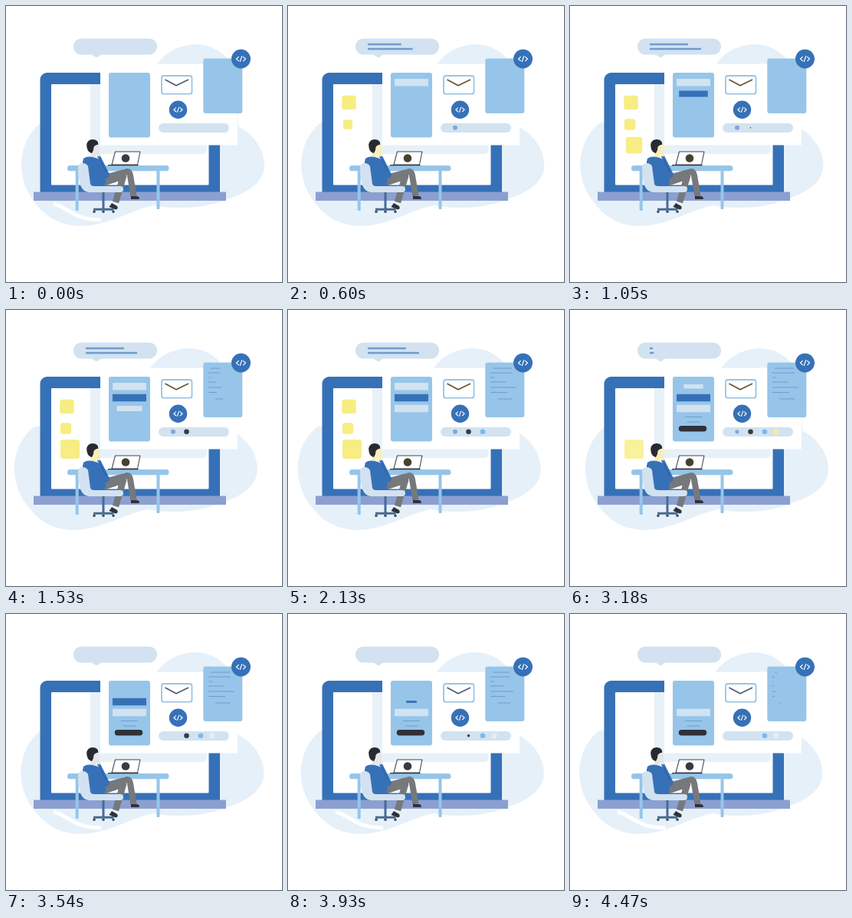
Recreate the animation shown at these times as an HTML page with a canvas. Size 360x360 px, loop 4500 ms.

```html
<!DOCTYPE html>
<html lang="en">
<head>
<meta charset="utf-8">
<title>Web design at a desk</title>
<style>
html, body { margin: 0; width: 100%; height: 100%; overflow: hidden; background: #fff; }
canvas { display: block; width: 360px; height: 360px; }
</style>
</head>
<body>
<canvas id="stage"></canvas>
<script>
const LOOP = 4500, STEP = 30;
const BLUE = '#3671b8', SKY = '#96c5e9', PALE = '#d2e2f0', MIST = '#e6f0f9',
      LINE = '#6f9bcf', DARK = '#303139', YELLOW = '#f7ed83', GREY = '#77787b';
const canvas = document.getElementById('stage');
const ctx = canvas.getContext('2d');
const dpr = window.devicePixelRatio || 1;
canvas.width = canvas.height = 360 * dpr;
ctx.scale(dpr, dpr);
ctx.lineJoin = 'round';

// Eased 0..1 progress between two times
function ramp(t, from, to) {
  const x = Math.min(1, Math.max(0, (t - from) / (to - from)));
  return (1 - Math.cos(Math.PI * x)) / 2;
}

// Visible amount of a part that enters and later leaves
const presence = (t, a, b, c, d) => ramp(t, a, b) * (1 - ramp(t, c, d));

function box(x, y, w, h, r, color) {
  if (w <= 0 || h <= 0) return;
  ctx.fillStyle = color;
  ctx.beginPath();
  ctx.roundRect(x, y, w, h, r);
  ctx.fill();
}

function scaledBox(cx, cy, w, h, r, color, s) {
  box(cx - w * s / 2, cy - h * s / 2, w * s, h * s, r * s, color);
}

function disc(x, y, r, color) {
  if (r <= 0) return;
  ctx.fillStyle = color;
  ctx.beginPath();
  ctx.arc(x, y, r, 0, Math.PI * 2);
  ctx.fill();
}

function shape(d, color) {
  ctx.fillStyle = color;
  ctx.fill(new Path2D(d));
}

function stroke(d, color, width, cap = 'butt') {
  ctx.strokeStyle = color;
  ctx.lineWidth = width;
  ctx.lineCap = cap;
  ctx.stroke(new Path2D(d));
}

function growLine(x, y, length, amount, color, width) {
  if (amount > 0.01) stroke(`M${x} ${y}h${length * amount}`, color, width);
}

function drawBlob(t, warm) {
  ctx.save();
  ctx.translate(-4.6 * (1 - Math.cos(2 * Math.PI * t / 3270)), 0);
  shape(`M46 152 C30 164 20 185 20 207 C20 228 29 247 40 259
    C55 278 75 287 98 287 C136 286 162 266 194 260 C222 266 262 264 288 252
    C316 244 337 229 337 208 C337 186 323 168 303 157
    C302 125 304 92 290 70 C276 54 261 50 246 50 C223 51 205 63 196 78
    L120 150 Z`, MIST);
  ctx.restore();
  if (!warm) stroke('M62 258 C80 262 88 279 124 279', '#fff', 5);
}

function drawScreen() {
  box(44.5, 87, 234.5, 157, [9, 9, 0, 0], BLUE);
  box(59, 102, 205.5, 131.5, 1, '#fff');
  box(36, 242.5, 251, 11.5, 0, '#8ba0d1');
  box(110, 102, 151.5, 91, [0, 0, 5, 0], '#e8f0f8');
  box(123, 75.5, 179, 106, 1, '#fff');
}

function drawBubble(t) {
  box(88, 42.5, 109, 21, 10, PALE);
  shape('M111 63 L118 67.5 L125 63 Z', PALE);
  const k = presence(t, 100, 750, 2650, 3300);
  growLine(104, 50, 50, k, LINE, 2.4);
  growLine(104, 56, 67, k, LINE, 2.4);
}

function drawNotes(t) {
  const notes = [
    [79.5, 126, 18.5, 180, 2350, 2750],
    [78, 154.5, 14.5, 300, 2650, 3050],
    [83.5, 181.5, 25, 750, 3020, 3560]
  ];
  for (const [x, y, size, enter, leave, gone] of notes) {
    ctx.globalAlpha = 1 - ramp(t, leave, gone);
    scaledBox(x, y, size, size, 3.5, YELLOW, ramp(t, enter, enter + 400));
  }
  ctx.globalAlpha = 1;
}

function drawForm(t) {
  box(134, 87, 54, 84.5, 3, SKY);
  scaledBox(161, 99.7, 44, 9.5, 0, PALE, presence(t, 200, 560, 3000, 3400));
  scaledBox(161, 114.5, 44, 9.5, 0, BLUE, presence(t, 780, 1140, 3680, 4080));
  scaledBox(161, 128.5, 44, 9.5, 0, PALE, presence(t, 1290, 1650, 4460, 4860));
  const a = ramp(t, 2150, 2500), b = ramp(t, 2300, 2650);
  growLine(161 - 11 * a, 139.5, 22, a, LINE, 1);
  growLine(161 - 8.5 * b, 146, 17, b, LINE, 1);
  scaledBox(160, 154.7, 36.5, 7.5, 3.7, DARK, ramp(t, 2550, 2900));
}

function drawDocument(t) {
  box(257.3, 68.5, 51, 71.5, 3, SKY);
  const lines = [[267, 25], [263, 30], [264.5, 5], [264, 20], [264, 34], [264, 22], [273, 20]];
  const ys = [76, 82, 88, 94, 101, 107.5, 116];
  const k = presence(t, 1100, 1960, 3720, 4700);
  lines.forEach(([x, w], i) => growLine(x, ys[i], w, k, '#7499cb', 1));
}

function drawEnvelope(warm) {
  ctx.beginPath();
  ctx.roundRect(203, 91, 39.5, 23.7, 3);
  ctx.fillStyle = '#fff';
  ctx.fill();
  ctx.strokeStyle = SKY;
  ctx.lineWidth = 1.8;
  ctx.stroke();
  stroke('M207.5 96 L222 103.8 L238 96', warm ? '#66552f' : '#505a78', 1.7);
}

function drawCodeBadge(x, y, r) {
  disc(x, y, r, BLUE);
  ctx.save();
  ctx.translate(x, y);
  ctx.scale(r / 12, r / 12);
  stroke('M-3 -2.5 L-5.7 0 L-3 2.5 M3 -2.5 L5.7 0 L3 2.5 M1.2 -3.3 L-1.2 3.3',
    '#f4f8fc', 1.2, 'round');
  ctx.restore();
}

function drawSlider(t, warm) {
  box(199, 153, 92, 12, 6, PALE);
  disc(218, 158.8, 3 * presence(t, 230, 550, 3080, 3500), '#7fa8d8');
  disc(235.5, 158.8, 3.3 * presence(t, 950, 1270, 3700, 4180), '#393b43');
  disc(254, 158.8, 3.3 * presence(t, 1700, 2050, 4460, 4860), '#7db8e8');
  disc(269, 158.8, 3.7 * ramp(t, 2400, 2750), warm ? '#f2eda0' : '#e8ecef');
}

function drawDesk(warm) {
  box(90.7, 213, 4, 54, 1, SKY);
  box(196.5, 213, 4, 52, 1, SKY);
  box(80, 208, 132.5, 7.3, 3.6, SKY);
  const lid = 'M142.5 190 H175 L171.5 207 H138 Z';
  shape(lid, '#fff');
  stroke(lid, '#454b58', 1.1);
  stroke('M133 207.6 H172.5', DARK, 1.3);
  disc(156, 198.5, 5.3, warm ? '#46422f' : '#383a43');
}

function drawPerson(warm) {
  const skin = warm ? '#f7efb9' : '#e5e6e9';
  // Chair stand
  stroke('M127 242 V265 M114 265.3 H140.5', '#496b91', 3);
  for (const x of [115, 127, 140]) disc(x, 268.2, 1.8, '#3d5267');
  // Legs and shoes
  stroke('M123 232 L153 222 L143 256', GREY, 8.5);
  stroke('M124 225 L158 216 Q161 216 162 221 L166.5 248', GREY, 8);
  shape('M163 248 L171 248 Q175 249 173.5 252 L163 252 Z', DARK);
  shape('M138 257 L145 261 Q147 265 143 265.5 L134.5 262 Z', DARK);
  // Body and the arm that props the chin
  shape(`M101 199 C106 195 115 196 121 200 L128 211 L135 219
    Q136 224 130 225 L129 235 H108 C105 222 97 210 101 199 Z`, BLUE);
  stroke('M121 196 L133 220', BLUE, 4, 'round');
  stroke('M122 200 L130 216', '#295989', 0.8);
  // Head
  shape('M112 185 L121 179 L122.5 188 Q122 193 118 194 L117 198 L110 196 Z', skin);
  disc(121, 194, 2.4, skin);
  shape(`M105.5 184 C104 177 109 174 113 174 C118 174 121 177 120 181
    C116 181 114 183 114 188 L112 192 C108 191 106 188 105.5 184 Z`, '#292a31');
  // Chair back and seat
  shape(`M94 210 C94 204 104 203 107 209 L110 232 Q111 235 115 235
    H149 Q153 235 153 239 Q153 243 149 243 H108 C98 241 95 234 94 210 Z`, PALE);
}

function draw(t) {
  const warm = t > 210 && t < 3500;
  ctx.fillStyle = '#fff';
  ctx.fillRect(0, 0, 360, 360);
  drawBlob(t, warm);
  drawScreen();
  drawBubble(t);
  drawNotes(t);
  drawForm(t);
  drawDocument(t);
  drawEnvelope(warm);
  drawCodeBadge(224.5, 135.3, 11.7);
  drawCodeBadge(306.5, 69, 12.5);
  drawSlider(t, warm);
  drawDesk(warm);
  drawPerson(warm);
}

const start = performance.now();
function tick() {
  const t = (performance.now() - start) % LOOP;
  draw(Math.floor(t / STEP) * STEP);
  requestAnimationFrame(tick);
}
tick();
</script>
</body>
</html>
```
